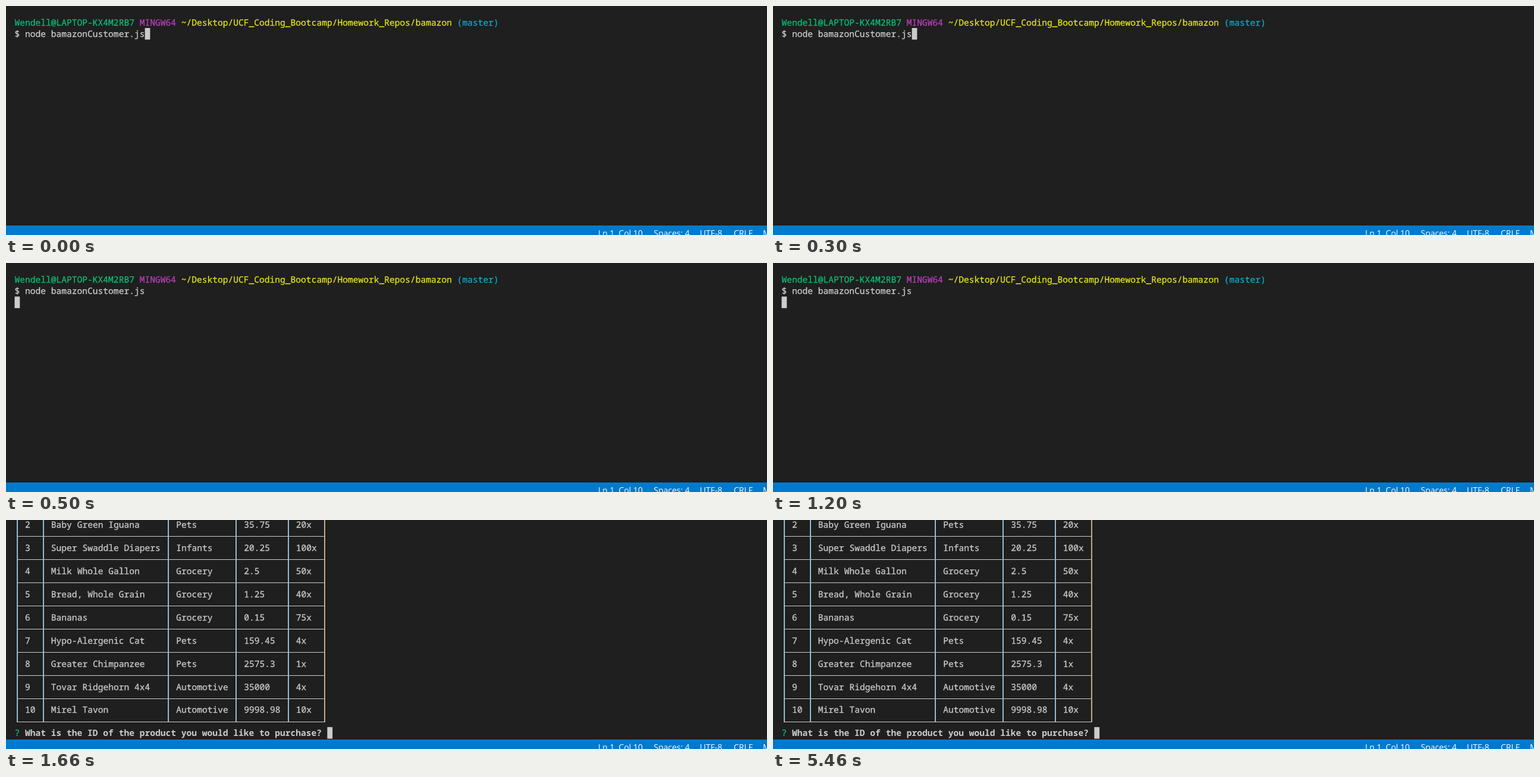
Animation, 1280 px wide and 385 px high, one loop 8000 ms. Source, as an HTML page:

```html
<!DOCTYPE html>
<html lang="en">
<head>
<meta charset="utf-8">
<style>
  html, body { margin: 0; width: 100%; height: 100%; overflow: hidden; background: #1e1f1e; }
  svg { display: block; color: #ccc; }
  text {
    font: 14.608px "Noto Sans Mono", monospace;
    white-space: pre;
    text-rendering: geometricPrecision;
  }
  text, tspan { fill: currentColor; stroke: currentColor; stroke-width: .3px; }
  .status text { font: 14px "Open Sans", sans-serif; color: #fff; stroke: none; }
  .bold { font-weight: bold; stroke: none; }
</style>
</head>
<body>
<svg id="stage" width="1280" height="385" viewBox="0 0 1280 385"></svg>
<script>
const LOOP = 8000, ENTER_AT = 500, TABLE_AT = 1660;
const LEFT = 14.5, CELL = 8.765, LINE = 19.45;
const GREEN = '#0dbc79';

const colX = col => LEFT + col * CELL;
const rect = (x, y, w, h, fill) =>
  `<rect x="${x}" y="${y}" width="${w}" height="${h}" fill="${fill}"/>`;
const text = (x, y, str, attrs = '') => `<text x="${x}" y="${y}" ${attrs}>${str}</text>`;
const span = (color, str) => `<tspan color="${color}">${str}</tspan>`;
const cursor = (col, row) => rect(colX(col), 17.55 + row * LINE, CELL, LINE, '#ccc');

const prompt =
  text(LEFT, 33,
    span(GREEN, 'Wendell@LAPTOP-KX4M2RB7 ') +
    span('#bc3fbc', 'MINGW64 ') +
    span('#e5e510', '~/Desktop/UCF_Coding_Bootcamp/Homework_Repos/bamazon ') +
    span('#11a8cd', '(master)')) +
  text(LEFT, 52, '$ node bamazonCustomer.js');

const products = [
  ['2', 'Baby Green Iguana', 'Pets', '35.75', '20x'],
  ['3', 'Super Swaddle Diapers', 'Infants', '20.25', '100x'],
  ['4', 'Milk Whole Gallon', 'Grocery', '2.5', '50x'],
  ['5', 'Bread, Whole Grain', 'Grocery', '1.25', '40x'],
  ['6', 'Bananas', 'Grocery', '0.15', '75x'],
  ['7', 'Hypo-Alergenic Cat', 'Pets', '159.45', '4x'],
  ['8', 'Greater Chimpanzee', 'Pets', '2575.3', '1x'],
  ['9', 'Tovar Ridgehorn 4x4', 'Automotive', '35000', '4x'],
  ['10', 'Mirel Tavon', 'Automotive', '9998.98', '10x'],
];
const borders = [0, 5, 29, 42, 52, 59];

function table() {
  const barX = borders.map(col => Math.round(colX(col + 0.5)) - 1);
  const last = barX.length - 1;
  const rows = products.map((cells, i) => {
    const top = i * 2 * LINE;
    return cells.map((str, c) => text(colX(borders[c] + 2), Math.round(13.2 + top), str)).join('') +
      rect(barX[0], Math.round(27.4 + top), barX[last] - barX[0] + 2, 1, '#ccc');
  });
  const bars = barX.map((x, i) => rect(x, 0, 2, 339, i < last ? '#94bad8' : '#cba880'));
  return rows.join('') + bars.join('');
}

const question =
  text(LEFT, 363, span(GREEN, '?')) +
  text(colX(2), 363, 'What is the ID of the product you would like to purchase?', 'class="bold"');

const statusItems = [[996, 'Ln 1, Col 10'], [1089.5, 'Spaces: 4'], [1167, 'UTF-8'], [1224, 'CRLF'], [1273, 'MySQL']];
const statusBar = '<g class="status">' + rect(0, 369, 1280, 16, '#007acc') +
  statusItems.map(([x, str]) => text(x, 387, str)).join('') + '</g>';

const scenes = [
  prompt + cursor(25, 1),
  prompt + cursor(0, 2),
  table() + question + cursor(60, 17),
];

const stage = document.getElementById('stage');
stage.innerHTML = scenes.map(s => `<g class="scene">${s}</g>`).join('') + statusBar;
const groups = stage.querySelectorAll('.scene');
const start = performance.now();

function draw() {
  const t = (performance.now() - start) % LOOP;
  const current = t < ENTER_AT ? 0 : t < TABLE_AT ? 1 : 2;
  groups.forEach((g, i) => g.setAttribute('display', i === current ? 'inline' : 'none'));
  requestAnimationFrame(draw);
}
draw();
</script>
</body>
</html>
```
